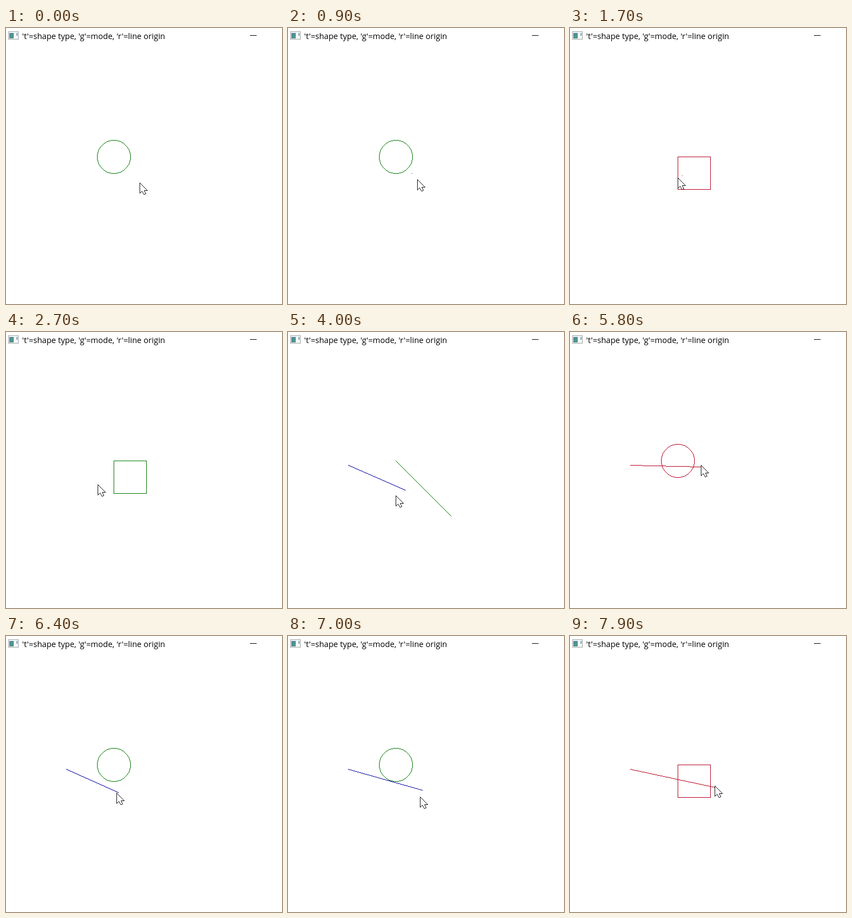
Animation of 500 by 500 pixels, one loop 8000 ms. Source, as an HTML page with a canvas:

```html
<!DOCTYPE html>
<html lang="en">
<meta charset="utf-8">
<title>Shape collisions</title>
<style>
html, body { margin: 0; width: 100%; height: 100%; overflow: hidden; background: #fff; }
canvas { display: block; }
</style>
<canvas id="stage" width="500" height="500"></canvas>
<script>
const ctx = document.getElementById('stage').getContext('2d');
const LOOP = 8000, STEP = 100;
const RED = '#b40020', GREEN = '#007600', BLUE = '#0000a0';
const ORIGIN = [109, 241];

// Turning points of the pointer: time, x, y; it eases between them
const stops = [
  [0, 242, 280], [550, 205, 240], [1100, 246, 288], [1600, 202, 265], [1900, 175, 290],
  [2300, 212, 262], [2600, 166, 276], [3000, 166, 276], [3650, 244, 262], [4100, 188, 300],
  [4600, 244, 264], [5250, 214, 316], [5750, 238, 240], [6400, 200, 284],
  [6900, 242, 277], [7200, 230, 332], [7850, 262, 271]
];

function pointer(t) {
  const i = stops.findIndex(s => s[0] >= t);
  if (i <= 0) return stops.at(i).slice(1);
  const [t0, x0, y0] = stops[i - 1], [t1, x1, y1] = stops[i];
  const k = (1 - Math.cos(Math.PI * (t - t0) / (t1 - t0))) / 2;
  return [Math.round(x0 + (x1 - x0) * k), Math.round(y0 + (y1 - y0) * k)];
}

const dot = (x, y) => ctx.fillRect(Math.round(x), Math.round(y), 1, 1);

// Unsmoothed line, one pixel per step along the longer axis
function line(x0, y0, x1, y1) {
  const n = Math.max(Math.abs(x1 - x0), Math.abs(y1 - y0)) || 1;
  for (let i = 0; i <= n; i++) dot(x0 + (x1 - x0) * i / n, y0 + (y1 - y0) * i / n);
}

// All shapes hang on one anchor
const X = 195, Y = 233, R = 30, SIDE = 59, REACH = 100;
const shapes = {
  circle: {
    draw() {
      for (let i = -21; i <= 21; i++) {
        const d = Math.round(Math.sqrt(R * R + 1 - i * i));
        for (const s of [-d, d]) { dot(X + i, Y + s); dot(X + s, Y + i); }
      }
    },
    hit: (x, y) => Math.hypot(x - X, y - Y) <= R
  },
  box: {
    draw() {
      for (const d of [0, SIDE]) {
        line(X, Y + d, X + SIDE, Y + d);
        line(X + d, Y, X + d, Y + SIDE);
      }
    },
    hit: (x, y) => x >= X && x <= X + SIDE && y >= Y && y <= Y + SIDE
  },
  line: {
    draw: () => line(X, Y, X + REACH, Y + REACH),
    hit: (x, y) => x >= X && x <= X + REACH && Math.abs(x - X - y + Y) < 1
  }
};

function shapeAt(t) {
  if (t < 1200) return shapes.circle;
  if (t < 2900) return shapes.box;
  if (t < 5000) return shapes.line;
  return t < 7300 ? shapes.circle : shapes.box;
}

function lineHits(shape, [x, y]) {
  for (let k = 0; k <= 1; k += 1 / 256)
    if (shape.hit(ORIGIN[0] + (x - ORIGIN[0]) * k, ORIGIN[1] + (y - ORIGIN[1]) * k)) return true;
  return false;
}

function rect(color, ...box) {
  ctx.fillStyle = color;
  ctx.fillRect(...box);
}

function titleBar() {
  rect('#a5a5a5', 4, 6, 19, 15);
  rect('#f4f6f6', 5, 7, 17, 13);
  const teal = ctx.createLinearGradient(6, 9, 14, 19);
  teal.addColorStop(0, '#4f86a0');
  teal.addColorStop(1, '#4f9f80');
  rect(teal, 6, 9, 8, 10);
  rect('#7aa0b8', 19, 9, 2, 5);
  rect('#000', 442, 13, 12, 1);
  ctx.font = '14.55px "Open Sans", "Noto Sans", sans-serif';
  ctx.fillText("'t'=shape type, 'g'=mode, 'r'=line origin", 29.3, 20);
}

const arrow = new Path2D('M.5 .5V19.5L4.5 15.5L8 21.8L11.3 20.3L8.4 14.5H14.3Z');

function drawPointer(x, y) {
  ctx.save();
  ctx.translate(x, y);
  ctx.fillStyle = '#fff';
  ctx.fill(arrow);
  ctx.strokeStyle = '#111';
  ctx.stroke(arrow);
  ctx.restore();
}

function frame() {
  const t = Math.floor(performance.now() % LOOP / STEP) * STEP;
  const [px, py] = pointer(Math.max(0, t - STEP));
  const tip = [px + 1, py + 2]; // the probe trails the pointer by one step
  const shape = shapeAt(t), lineMode = t >= 2900;
  const hit = lineMode ? lineHits(shape, tip) : shape.hit(...tip);

  rect('#fff', 0, 0, 500, 500);
  titleBar();
  ctx.fillStyle = hit ? RED : GREEN;
  shape.draw();
  ctx.fillStyle = hit ? RED : BLUE;
  if (lineMode) line(...ORIGIN, ...tip);
  else dot(...tip);
  drawPointer(...pointer(t));
  requestAnimationFrame(frame);
}
frame();
</script>
</html>
```
